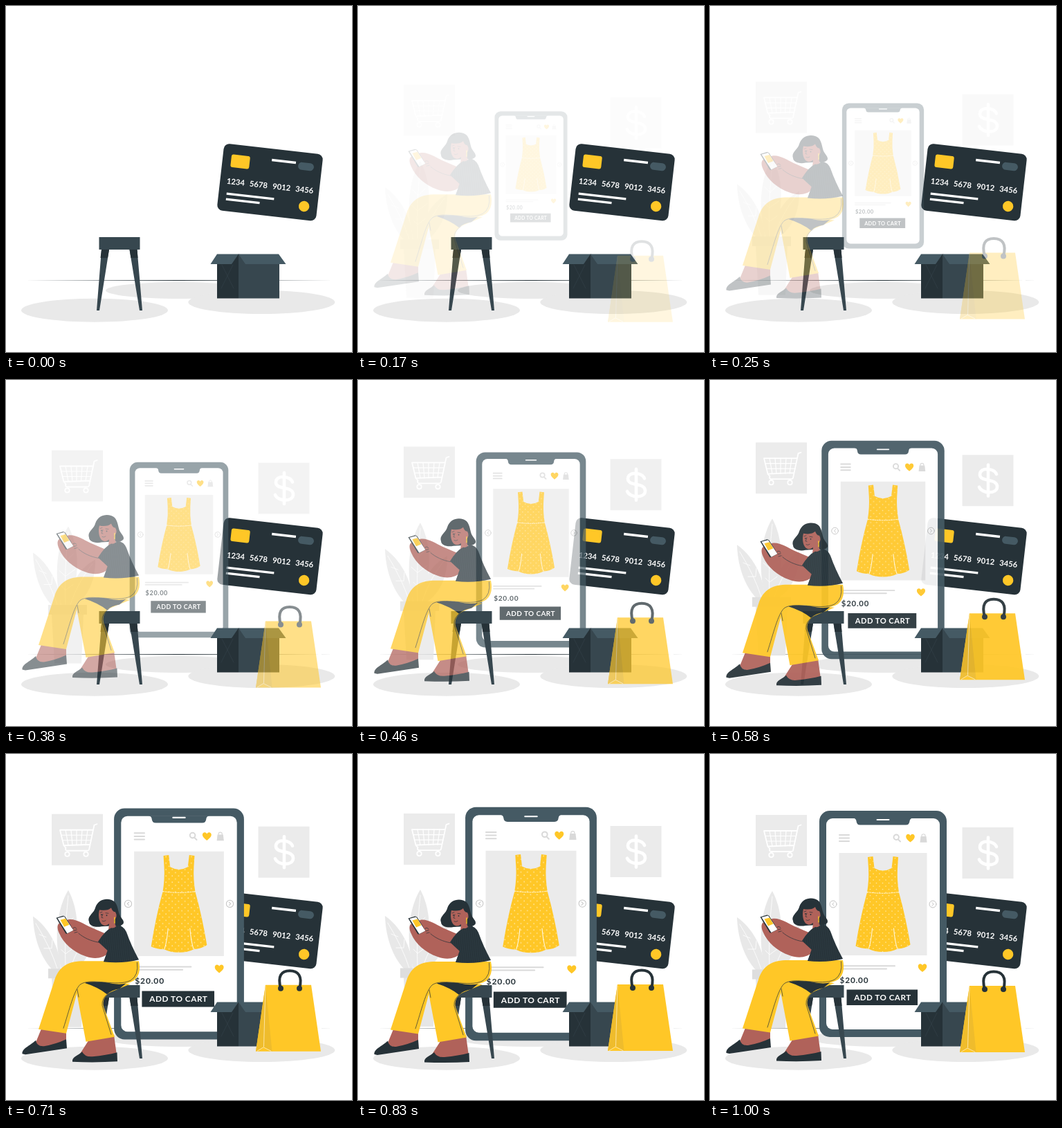
An HTML page for the animation above (1.04 s loop, 500x500 px).

```html
<!DOCTYPE html>
<html lang="en">
<head>
<meta charset="utf-8">
<title>Online shopping</title>
<style>
  html, body { margin: 0; width: 100%; height: 100%; overflow: hidden; background: #fff; }
  svg { display: block; width: 100vw; height: 100vh; }
  text { font-family: Lato, "Open Sans", sans-serif; font-weight: 700; }
  .dark { fill: #263238; }
  .slate { fill: #37474f; }
  .steel { fill: #455a64; }
  .sun { fill: #ffc727; }
  .skin { fill: #b0625a; }
  .pale { fill: #ebebeb; }
  .white { fill: #fff; }
  .stroke { fill: none; stroke-linecap: round; stroke-linejoin: round; }
  .ink { stroke: #263238; stroke-width: .7; }
  .chalk { stroke: #fff; }
  .mist { stroke: #d9d9d9; stroke-width: 2; }
</style>
</head>
<body>
<svg viewBox="0 0 500 500">
  <defs>
    <pattern id="dots" width="9" height="9" patternUnits="userSpaceOnUse">
      <circle cx="2" cy="2" r=".85" fill="#ffe69c"/>
      <circle cx="6.5" cy="6.5" r=".85" fill="#ffe69c"/>
    </pattern>
    <pattern id="stripes" width="3" height="9" patternUnits="userSpaceOnUse" patternTransform="rotate(-6)">
      <path d="M1 0V9" stroke="#37474f" stroke-width=".5"/>
    </pattern>
    <path id="heart" d="M0 6C-3 3.5 -6.3 1 -6.3 -2.3C-6.3 -6 -1.6 -7 0 -3.4C1.6 -7 6.3 -6 6.3 -2.3C6.3 1 3 3.5 0 6Z"/>
  </defs>

  <g id="floor">
    <g fill="#e9e9e9">
      <ellipse cx="250" cy="411" rx="106" ry="12"/>
      <ellipse cx="128" cy="439.7" rx="106" ry="17"/>
      <ellipse cx="369.3" cy="428" rx="106" ry="17"/>
    </g>
    <path class="dark" d="M28 396.500L250 395.900L472 396.500L250 397.100Z"/>
  </g>

  <g id="cart">
    <path class="pale" d="M66 88H140V162H66Z"/>
    <g class="stroke chalk" stroke-width="1.8">
      <path d="M131.5 102.5L127.5 104L120 139.5Q119.500 141 117 141H88Q85 140 86.500 137L83.500 133.500L78 111H126M83.500 133.500L121 132"/>
      <path stroke-width="1.2" d="M80 118.500H124.500M82 126H123M86 111L90 133M94 111L96 133M102 111V133M110 111L108.500 133M118 111L115 133"/>
      <circle cx="88.500" cy="146" r="3.200"/>
      <circle cx="115.500" cy="146" r="3.200"/>
    </g>
  </g>

  <g id="dollar">
    <path class="pale" d="M364.500 106H438.500V180H364.500Z"/>
    <path class="stroke chalk" stroke-width="4.600" d="M402 120.500V165.500M414 134C411 125 390 123 390 134.500C390 146 415 139 415 152C415 163 393 162.500 389 152.500"/>
  </g>

  <g id="plant">
    <g fill="#e8e8e8">
      <path d="M39 236C60 250 78 280 79 312H66C48 292 40 264 39 236Z"/>
      <path d="M90 198C104 224 109 262 92 312H80C68 268 74 224 90 198Z"/>
      <path d="M129 246C130 275 118 300 100 312H88C92 282 106 258 129 246Z"/>
    </g>
    <path class="stroke chalk" stroke-width=".8" d="M43 246Q64 280 74 311M90 206Q84 260 86 311M125 252Q104 278 93 311M48 262L58 266M55 282L66 282L67 270M79 240L87 248L97 238M77 262L86 270L100 260M80 284L86 290L97 282"/>
    <path fill="#e6e6e6" d="M66 325H112L109 396H70Z"/>
    <path fill="#dedede" d="M61 311.500H117V325.500H61Z"/>
  </g>

  <g id="card" transform="translate(381.500 254.800) rotate(6.500)">
    <rect class="dark" x="-72" y="-48.500" width="144" height="97" rx="8"/>
    <rect class="sun" x="-59.500" y="-34" width="27" height="18.500" rx="3"/>
    <rect class="steel" x="37.600" y="-34" width="23" height="11" rx="5.500"/>
    <g class="white">
      <rect x="-1" y="-34.200" width="35" height="3.600"/>
      <rect x="-60.500" y="21.700" width="69" height="3.200"/>
      <rect x="-60.500" y="29.800" width="49" height="3.200"/>
      <text x="-62.500" y="9" font-size="11.300" word-spacing="4.400">1234 5678 9012 3456</text>
    </g>
    <circle class="sun" cx="52.800" cy="28.900" r="7.700"/>
  </g>

  <g id="phone">
    <rect class="steel" x="158" y="82" width="184" height="327" rx="15"/>
    <rect class="white" x="168" y="93" width="164" height="305" rx="9"/>
    <path class="steel" d="M207 92.500H293Q289 93 288.500 97Q288 102.500 283 102.500H217Q212 102.500 211.500 97Q211 93 207 92.500Z"/>
    <path class="stroke chalk" stroke-width="2" d="M241.500 95H258.500"/>

    <path class="stroke mist" stroke-linecap="butt" d="M187 117H201M187 121.500H201M187 126H201"/>
    <path class="stroke mist" stroke-width="1.800" d="M272 123.500L275 126.500M265.500 120.200a3.700 3.700 0 1 0 7.400 0a3.700 3.700 0 1 0 -7.400 0"/>
    <use href="#heart" class="sun" x="289.500" y="121.500"/>
    <path fill="#d9d9d9" d="M304.500 119H312.500L313.500 127.700H303.500Z"/>
    <path class="stroke mist" style="stroke-width:1.200" d="M306 120V118C306 115 311 115 311 118V120"/>

    <path class="pale" d="M186.500 143H313.500V291H186.500Z"/>
    <g class="stroke" stroke="#c4c4c4" stroke-width="1">
      <circle cx="178" cy="217" r="5"/>
      <circle cx="322" cy="217" r="5"/>
      <path d="M179.200 214.700L176.800 217L179.200 219.300M320.800 214.700L323.200 217L320.800 219.300"/>
    </g>

    <g id="dress"></g>
    <path class="stroke chalk" stroke-width=".9" d="M234.500 252Q233 270 229.500 281M265.500 252Q267 270 270.500 281"/>
    <path class="stroke chalk" stroke-width=".8" stroke-dasharray="2 1.500" d="M227 199.500Q250 203 273 199.500"/>

    <path class="stroke mist" stroke-linecap="butt" d="M187.500 306.300H267M187.500 310.500H255"/>
    <use href="#heart" class="sun" x="307" y="309"/>
    <text class="dark" x="187.600" y="330.500" font-size="11.800" letter-spacing=".8">$20.00</text>
    <path class="dark" d="M197.500 340.500H300V363H197.500Z"/>
    <text class="white" x="208.200" y="356.200" font-size="11.600" letter-spacing=".5">ADD TO CART</text>
  </g>

  <g id="box">
    <path class="slate" d="M336 358.500L395 373V422.500H336Z"/>
    <path class="dark" d="M336 358.500V422.500H305V373Z"/>
    <path class="steel" d="M305 358.500H336L326 373H295.500ZM336 358.500H394L404.500 373H346Z"/>
    <path class="stroke" stroke="#37474f" stroke-width=".5" d="M312 374L329 408M328 374L311 408"/>
  </g>

  <g id="stool">
    <path class="slate" d="M138 352H149L135 440H131ZM178.500 352H189.500L197 440H193Z"/>
    <path class="dark" d="M138 352H149L147 364H136.500ZM178.500 352H189.500L190.500 364H180.500Z"/>
    <path class="slate" d="M134.500 334H193.500V352H134.500Z"/>
  </g>

  <g id="bag">
    <path class="sun" d="M375 335H441L455 431H361Z"/>
    <path fill="#efbc2c" d="M375 335L361 431L372 425L384.500 431Z"/>
    <path class="stroke" stroke="#ffe9ad" stroke-width=".9" d="M363 430.500L372 425L383 430.500M375 337L372.500 424"/>
    <path class="stroke" stroke="#263238" stroke-width="4" d="M397 340C392 322 398 314.500 410 314.500S429 322 424 340"/>
    <circle class="dark" cx="397" cy="340" r="4"/>
    <circle class="dark" cx="424" cy="340" r="4"/>
  </g>

  <g id="woman">
    <g id="feet">
      <path class="skin" d="M51 396L87 400V415L58 424L42 418ZM121 410L156 405L160 434L120 439L107 432Z"/>
      <path class="dark" d="M23.500 432C23 424 34 421 43 412.500Q45 422 55 421Q72 418 87 411L88 424Q55 429 28 433ZM96 443.500C95 436 104 435 110 429Q114 437 125 436Q145 434 160.500 430L161 443Q130 445 96 443.500Z"/>
    </g>
    <path class="sun" d="M101 338L115.500 414.500L157 407.500L141 364Q138 351 151 343L180 331L115 326Z"/>
    <path class="dark" d="M112 329C132 326 155 331 176 328L164 338Q152 340 146 346Q134 336 112 329Z"/>
    <path class="sun" d="M141 298H192Q196 317 185 326Q170 335 145 329Q124 325 113 330Q104 335 101 350L87 402.500L47 396.500L70 326C77 304 92 298 112 298Z"/>
    <path class="stroke ink" d="M83 395C92 367 98 341 107 332C122 321 160 336 180 326Q192 319 189.500 300M152 404L139 362Q138 351 149 344M103 339L105 350"/>

    <path class="dark" d="M120 241C117 233 127 229 129 221C133 209 144 207 152 209.500C160 212 161 220 163 228C165 236 172 239 169.500 244C165 249 157 247 155 247L138 248C129 250 120 247 120 241Z"/>
    <path class="skin" d="M135 224Q147 226 152 221Q154 227 158 227Q162 234 156 239L160 252L148 253L149 244Q143 249 138 244.500C134 240 133 231 135 224Z"/>
    <path class="stroke ink" d="M136 228L139 227M144 228.500L148 229M140 230L138 235L140 235.500M139 240Q141.500 241.500 144 239.500"/>
    <circle class="dark" cx="138" cy="231" r=".9"/>
    <circle class="dark" cx="145.500" cy="232" r=".9"/>
    <path class="stroke" stroke="#ffc727" stroke-width="1.400" d="M157 235V243"/>

    <path class="skin" d="M90 238C100 236 112 244 122 249L143 258L148 286C141 294 128 296 115 291C97 285 83 272 77 258C73 250 74 243 79 243Z"/>
    <g id="shirt"></g>
    <path class="stroke ink" d="M101 248Q106 250 104 256M105 258C112 264 122 269 134 271M147 283L142 298"/>

    <path class="dark" d="M72.500 235.500L82.500 232.500Q84.500 232.500 85.500 234L98 253.500L88 258.500Q86.500 259 85.500 257Z"/>
    <path class="white" d="M74.500 236L84 233.500L97.500 253.500L88.500 258Z"/>
    <path class="sun" d="M78.500 238.500L86 236.500L91.500 245.500L84 248.500Z"/>
    <path class="skin" d="M94 249Q99 243 105 248Q109 254 103 257Q98 261 95 256L98 252ZM76 246Q80 246 82 252L88 262L80 262Z"/>
    <path class="stroke ink" d="M97 250Q100 248 102 251M98 254L102 253M99 257L103 256"/>
  </g>
</svg>
<script>
  const byId = id => document.getElementById(id);

  // Solid shape with a pattern laid over it.
  function fillPatterned(id, path, colorClass, pattern) {
    byId(id).innerHTML = `<path class="${colorClass}" d="${path}"/><path fill="url(#${pattern})" d="${path}"/>`;
  }
  fillPatterned('dress',
    'M228 149L235.500 148L237.500 165Q250 172 262.500 165L264.500 148L272 149L271 165Q270 182 273 200' +
    'Q283 236 289.500 275.500Q282 281 271 281.500Q262 286 250 286Q238 286 229 281.500Q217 281 210.500 277.500' +
    'Q217 236 227 200Q230 182 229 165Z', 'sun', 'dots');
  fillPatterned('shirt',
    'M152 250Q157 251 161 246Q170 247 174 256Q181 276 192 296Q168 302 141 299L147 283L133 270Q143 254 152 250Z',
    'dark', 'stripes');

  const LOOP = 1040, FPS = 24, SLIDE = 30;
  const slides = { cart: SLIDE, dollar: SLIDE, plant: SLIDE, bag: SLIDE, woman: -SLIDE };

  const cubic = (a, b, s) => 3 * (1 - s) ** 2 * s * a + 3 * (1 - s) * s * s * b + s ** 3;

  // cubic-bezier(.36, -.01, .5, 1.38)
  function overshoot(x) {
    let low = 0, high = 1;
    for (let i = 0; i < 30; i++) {
      const mid = (low + high) / 2;
      if (cubic(.36, .5, mid) < x) low = mid; else high = mid;
    }
    return cubic(-.01, 1.38, low);
  }

  function place(id, opacity, transform) {
    const part = byId(id);
    part.setAttribute('opacity', opacity);
    part.setAttribute('transform', transform);
  }

  function render(time) {
    // Frame starts are rounded to 10 ms.
    const step = Math.min(FPS, Math.floor((time % LOOP + 4.9) * FPS / 1000));
    const eased = step < 2 ? 0 : overshoot(Math.min(1, (step + .75) / FPS));
    const opacity = Math.max(0, Math.min(1, eased));
    for (const [id, distance] of Object.entries(slides)) {
      place(id, opacity, `translate(0 ${distance * (1 - eased)})`);
    }
    place('phone', opacity, `translate(250 245.5) scale(${.5 + .5 * eased}) translate(-250 -245.5)`);
  }

  let start;
  function tick(now) {
    start ??= now;
    render(now - start);
    requestAnimationFrame(tick);
  }
  render(0);
  requestAnimationFrame(tick);
</script>
</body>
</html>
```
